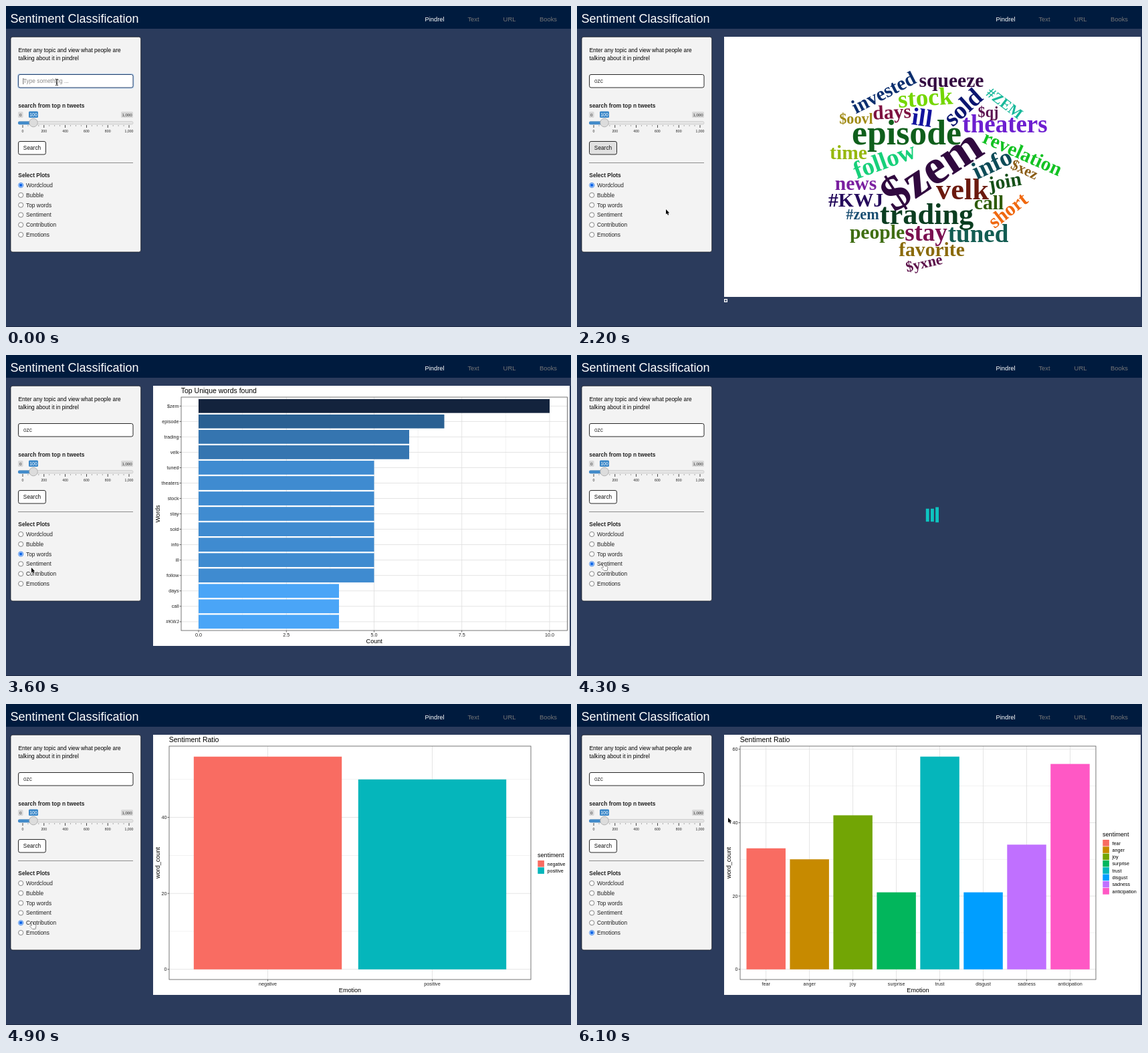
Write an HTML page with a canvas that moves like this. It is 845 by 480 pixels and loops after 6200 ms.

```html
<!DOCTYPE html>
<html lang="en">
<head>
<meta charset="utf-8">
<title>Sentiment Classification</title>
<style>
  html, body { margin: 0; width: 100%; height: 100%; overflow: hidden; background: #2b3b5c; }
  canvas { display: block; }
</style>
</head>
<body>
<canvas id="stage" width="845" height="480"></canvas>
<script>
const ctx = document.getElementById('stage').getContext('2d');
const LOOP = 6200, STEP = 100;
const SANS = '"Liberation Sans", Arial, sans-serif';
const SERIF = '"Liberation Serif", "Times New Roman", serif';
const QUERY = 'ozc';
const OPTIONS = ['Wordcloud', 'Bubble', 'Top words', 'Sentiment', 'Contribution', 'Emotions'];
const CORAL = '#f96c62', TEAL = '#05b6bb';

// Pointer path: time, x, y
const PATH = [
  [0, 76, 114], [700, 76, 114], [1100, 43, 218], [1500, 43, 218], [2000, 133, 304],
  [2500, 133, 304], [2900, 40, 297], [3400, 40, 297], [3600, 38, 318], [3800, 40, 312],
  [4400, 40, 312], [4600, 39, 326], [4900, 39, 326], [5100, 42, 340], [5400, 42, 340],
  [5800, 226, 170], [6200, 226, 170]
];
const SELECTED = [[0, 0], [3300, 2], [4300, 3], [4600, 4], [5100, 5]];
const VIEWS = [
  [0, () => {}], [1200, spinner], [1800, wordCloud], [3300, spinner], [3500, topWords],
  [4300, spinner], [4400, sentimentPlot], [5200, spinner], [5400, emotionPlot]
];

// word, count, centre x, centre y, degrees, colour
const CLOUD = [
  ['$zem', 10, 531, 246, -33, '#30093f'], ['episode', 7, 493, 191.5, 0, '#0f5f1c'],
  ['trading', 6, 523, 312.7, 0, '#0a3d20'], ['velk', 6, 576.5, 275.7, 0, '#6b1a0f'],
  ['theaters', 5, 640, 178, 0, '#6d1fd0'], ['stock', 5, 521, 138, -4, '#74d600'],
  ['stay', 5, 522, 340, 0, '#7a1050'], ['tuned', 5, 600, 342, 0, '#135c52'],
  ['sold', 5, 578, 152, -42, '#0a1570'], ['info', 5, 621, 237, -25, '#0d4b57'],
  ['ill', 5, 516, 168, 8, '#12129e'], ['follow', 5, 460, 232, -20, '#17d07a'],
  ['squeeze', 4, 560, 112, 0, '#33093f'], ['days', 4, 471, 159.5, -3, '#7d1040'],
  ['people', 4, 449, 339, 0, '#3f6d12'], ['favorite', 4, 530.5, 365, 0, '#8a6a0a'],
  ['call', 4, 616, 295, 0, '#2f5c0a'], ['#KWJ', 4, 417, 291, 0, '#250a5c'],
  ['news', 4, 417, 266, 0, '#7a1fa0'], ['time', 4, 406, 220, 0, '#96b80f'],
  ['join', 4, 640, 263, -10, '#155018'], ['invested', 4, 459, 130, -27, '#0b2e6e'],
  ['short', 4, 645, 306, -38, '#f0680f'], ['revelation', 4, 666, 221, 24, '#12c222'],
  ['$qj', 3, 615, 159, 0, '#5a0f4f'], ['$oovl', 3, 417.5, 169, 0, '#a08a14'],
  ['#zem', 3, 427, 312, 0, '#1b4f73'], ['$xez', 3, 669, 245, 25, '#8a5c14'],
  ['#ZEM', 3, 639, 146, 37, '#17b89a'], ['$yxne', 3, 519, 385, -13, '#5c0f4a']
];
const TOP = ['$zem', 'episode', 'trading', 'velk', 'tuned', 'theaters', 'stock', 'stay',
  'sold', 'info', 'ill', 'follow', 'days', 'call', '#KWJ'];
const SHADES = { 10: '#13233d', 7: '#2a6092', 6: '#3575b0', 5: '#3f8bd0', 4: '#4aa5f7' };

function rect(x, y, w, h, color) {
  ctx.fillStyle = color;
  ctx.fillRect(x, y, w, h);
}

function box(x, y, w, h, r, fill, stroke, width = 0.9) {
  ctx.beginPath();
  ctx.roundRect(x, y, w, h, r);
  ctx.fillStyle = fill;
  ctx.fill();
  if (stroke) {
    ctx.strokeStyle = stroke;
    ctx.lineWidth = width;
    ctx.stroke();
  }
}

function disc(x, y, r, fill, stroke) {
  ctx.beginPath();
  ctx.arc(x, y, r, 0, 7);
  ctx.fillStyle = fill;
  ctx.fill();
  if (stroke) {
    ctx.strokeStyle = stroke;
    ctx.lineWidth = 0.8;
    ctx.stroke();
  }
}

function text(str, x, y, size = 8.4, color = '#111', align = 'left', weight = '') {
  ctx.font = `${weight} ${size}px ${SANS}`;
  ctx.textAlign = align;
  ctx.fillStyle = color;
  ctx.fillText(str, x, y);
}

function turned(x, y, degrees, draw) {
  ctx.save();
  ctx.translate(x, y);
  ctx.rotate(degrees * Math.PI / 180);
  draw();
  ctx.restore();
}

const latest = (list, t) => list.filter(e => e[0] <= t).pop()[1];
const ease = x => x * x * (3 - 2 * x);
const rowY = i => 268 + i * 14.8;

function header() {
  rect(0, 0, 845, 480, '#2b3b5c');
  rect(0, 479, 845, 1, '#1f2b45');
  rect(0, 0, 845, 34, '#001b3e');
  text('Sentiment Classification', 6.5, 25, 18, '#fff');
  [['Pindrel', 641], ['Text', 699], ['URL', 753], ['Books', 811]].forEach(([name, x], i) =>
    text(name, x, 22.7, 9.4, i ? '#777' : '#fff', 'center'));
}

function slider() {
  box(18, 158, 7.5, 9, 1.5, '#d8d8d8');
  text('0', 21.7, 165, 6.2, '#333', 'center');
  box(172, 158, 18, 9, 1.5, '#d8d8d8');
  text('1,000', 181, 165, 6, '#333', 'center');
  box(34, 157.5, 14, 9.5, 1.5, '#3a87c8');
  text('100', 41, 165, 6.8, '#fff', 'center');
  box(18.5, 172.5, 171.5, 4.5, 2, '#e4e4e4', '#cfcfcf');
  box(18, 172.5, 23, 4.8, 2, '#428bca');
  for (let i = 0; i <= 20; i++) {
    const x = 25 + i * 7.95, major = i % 4 === 0;
    rect(x - 0.4, 178, 0.8, major ? 4 : 2, major ? '#222' : '#999');
    if (major) text((i * 50).toLocaleString('en-US'), x, 189.2, 5.2, '#222', 'center');
  }
  disc(41, 174.5, 6.3, '#dcdcdc', '#a8a8a8');
}

function sidebar(t) {
  const chosen = latest(SELECTED, t);
  const focused = t < 1100;
  const pressed = t >= 1000 && chosen === 0;
  const typed = QUERY.slice(0, Math.max(0, Math.floor((t - 100) / 200)));
  box(7, 46.2, 194.7, 321.7, 3, '#f3f3f3', '#080c14', 0.7);
  text('Enter any topic and view what people are', 18.5, 69.3, 8.4, '#000');
  text('talking about it in pindrel', 18.5, 81.3, 8.4, '#000');

  if (focused) box(17, 101, 174.5, 22.5, 4, '#b9d3ee');
  box(18.5, 102.5, 171.5, 19.5, 2.5, '#fff', focused ? '#16305c' : '#111');
  text(typed || 'Type something ...', 26, 115.2, 8.3, typed ? '#333' : '#8a8a8a');
  if (focused) rect(26 + (typed ? ctx.measureText(typed).width : -0.5), 108, 0.7, 9, '#222');

  text('search from top n tweets', 18.3, 152, 8.4, '#222', 'left', 'bold');
  slider();
  box(18.5, 202.5, 41, 19.5, 2.5, pressed ? '#e1e1e1' : '#fff', '#111');
  text('Search', 39, 215.4, 8.3, '#111', 'center');
  rect(18, 234, 172, 1, '#8d8d8d');

  text('Select Plots', 18.3, 256, 8.4, '#222', 'left', 'bold');
  OPTIONS.forEach((name, i) => {
    const y = rowY(i), on = i === chosen;
    disc(22.2, y, 3.6, '#fff', on ? '#0b66e8' : '#686868');
    if (on) disc(22.2, y, 2.4, '#0b66e8');
    text(name, 30, y + 2.9, 8.4, '#222');
  });
}

function spinner(t) {
  const base = 0.92 + (t - 1300) / 1000 * 1.918, em = 4.85;
  for (let i = 0; i < 3; i++) {
    const p = (((base + (2 - i) * 0.16) % 1) + 1) % 1;
    const k = p < 0.4 ? ease(p / 0.4) : p < 0.8 ? ease((0.8 - p) / 0.4) : 0;
    rect(521.8 + i * 1.48 * em, 229.8 - 2 * em * k, em, (4 + 3 * k) * em, '#0dc5c1');
  }
}

function sheet() {
  rect(220, 46, 623, 389, '#fff');
}

function wordCloud() {
  sheet();
  for (const [word, count, x, y, angle, color] of CLOUD) {
    const size = count * 7.4;
    turned(x, y, angle, () => {
      ctx.font = `bold ${size}px ${SERIF}`;
      ctx.textAlign = 'center';
      ctx.fillStyle = color;
      ctx.fillText(word, 0, size * 0.3);
    });
  }
  rect(220, 438, 5, 5, '#fff');
  rect(221.3, 439.3, 2.4, 2.4, '#2b3b5c');
}

function frame(left, right, title, xName, yName) {
  ctx.strokeStyle = '#555';
  ctx.lineWidth = 0.8;
  ctx.strokeRect(left, 63, right - left, 349);
  text(title, left - 0.3, 57, 10.5, '#000');
  text(xName, (left + right) / 2, 430.5, 9.1, '#000', 'center');
  turned(230, 237.5, -90, () => text(yName, 0, 0, 9.1, '#000', 'center'));
}

const hGrid = (left, right, y, major) =>
  rect(left, y - 0.4, right - left, 0.8, major ? '#dedede' : '#efefef');
const vGrid = (x, major) => rect(x - 0.4, 63, 0.8, 349, major ? '#dedede' : '#efefef');

function yTick(left, y, label) {
  rect(left - 2.5, y - 0.4, 2.5, 0.8, '#444');
  text(label, left - 3.5, y + 2.6, 7.2, '#222', 'right');
}

function xTick(x, label) {
  rect(x - 0.4, 412, 0.8, 2.5, '#444');
  text(label, x, 421, 7.2, '#222', 'center');
}

function topWords() {
  const left = 262, right = 839.5, zero = 288, unit = 52.5, gap = 23.04;
  sheet();
  for (let i = 0; i <= 8; i++) {
    const x = zero + i * 1.25 * unit;
    vGrid(x, i % 2 === 0);
    if (i % 2 === 0) xTick(x, (i * 1.25).toFixed(1));
  }
  TOP.forEach((word, i) => {
    const y = 76.3 + i * gap, count = CLOUD.find(c => c[0] === word)[1];
    hGrid(left, right, y, true);
    rect(zero, y - gap * 0.45, count * unit, gap * 0.9, SHADES[count]);
    yTick(left, y, word);
  });
  frame(left, right, 'Top Unique words found', 'Count', 'Words');
}

function columns({ right, unit, max, first, gap, legendX, legendY, bars }) {
  const left = 244, zero = 396.8;
  sheet();
  for (let v = 0; v <= max; v += 10) {
    const y = zero - v * unit;
    hGrid(left, right, y, v % 20 === 0);
    if (v % 20 === 0) yTick(left, y, v);
  }
  text('sentiment', legendX, legendY, 9.1, '#000');
  bars.forEach(([name, value, color], i) => {
    const x = first + i * gap, keyY = legendY + 5 + i * 10.3;
    vGrid(x, true);
    rect(x - gap * 0.45, zero - value * unit, gap * 0.9, value * unit, color);
    xTick(x, name);
    rect(legendX + 0.3, keyY, 9.6, 9.6, color);
    text(name, legendX + 14.4, keyY + 7.5, 7.2, '#000');
  });
  frame(left, right, 'Sentiment Ratio', 'Emotion', 'word_count');
}

function sentimentPlot() {
  columns({
    right: 785, unit: 5.68, max: 50, first: 391.5, gap: 246, legendX: 795, legendY: 229,
    bars: [['negative', 56, CORAL], ['positive', 50, TEAL]]
  });
}

function emotionPlot() {
  columns({
    right: 776, unit: 5.485, max: 60, first: 282.7, gap: 64.97, legendX: 786, legendY: 198,
    bars: [
      ['fear', 33, CORAL], ['anger', 30, '#c78a00'], ['joy', 42, '#72a505'],
      ['surprise', 21, '#02b65c'], ['trust', 58, TEAL], ['disgust', 21, '#009eff'],
      ['sadness', 34, '#c070ff'], ['anticipation', 56, '#ff58c5']
    ]
  });
}

const ARROW = new Path2D('M0 0V7.6L1.7 6L2.9 8.8L4.2 8.2L3.1 5.5H5.3Z');
const HAND = new Path2D('M-1.2 .6Q-.2 -.7 .8 .6L1.4 3.4L4.8 4.2Q6 4.6 5.7 6.2L4.9 10.2H.7L-2.9 6.4Q-3 4.8 -1.2 5.6L-.4 6Z');
const BEAM = new Path2D('M-2 -4.5Q0 -4.5 0 -3.5V3.5Q0 4.5 -2 4.5M2 -4.5Q0 -4.5 0 -3.5M0 3.5Q0 4.5 2 4.5M-1 1.5H1');

function pointer(t) {
  const n = PATH.findIndex(p => p[0] > t);
  const [t0, x0, y0] = PATH[n - 1], [t1, x1, y1] = PATH[n];
  const k = ease((t - t0) / (t1 - t0));
  const x = x0 + (x1 - x0) * k, y = y0 + (y1 - y0) * k;
  const overInput = x > 18 && x < 190 && y > 102 && y < 122;
  const overButton = x > 18 && x < 60 && y > 202 && y < 222;
  const overOption = x > 18 && x < 76 && OPTIONS.some((_, i) => Math.abs(y - rowY(i)) < 5);
  turned(x, y, 0, () => {
    ctx.lineJoin = 'round';
    if (overInput) {
      ctx.strokeStyle = '#111';
      ctx.lineWidth = 1;
      ctx.stroke(BEAM);
      return;
    }
    const hand = overButton || overOption, shape = hand ? HAND : ARROW;
    ctx.strokeStyle = hand ? '#111' : '#fff';
    ctx.fillStyle = hand ? '#fff' : '#000';
    ctx.lineWidth = hand ? 0.9 : 1.2;
    ctx.stroke(shape);
    ctx.fill(shape);
  });
}

function render(now) {
  const t = Math.floor((now % LOOP) / STEP) * STEP;
  header();
  sidebar(t);
  latest(VIEWS, t)(t);
  pointer(t);
}

let start;
function tick(now) {
  start ??= now;
  render(now - start);
  requestAnimationFrame(tick);
}
render(0);
requestAnimationFrame(tick);
</script>
</body>
</html>
```
